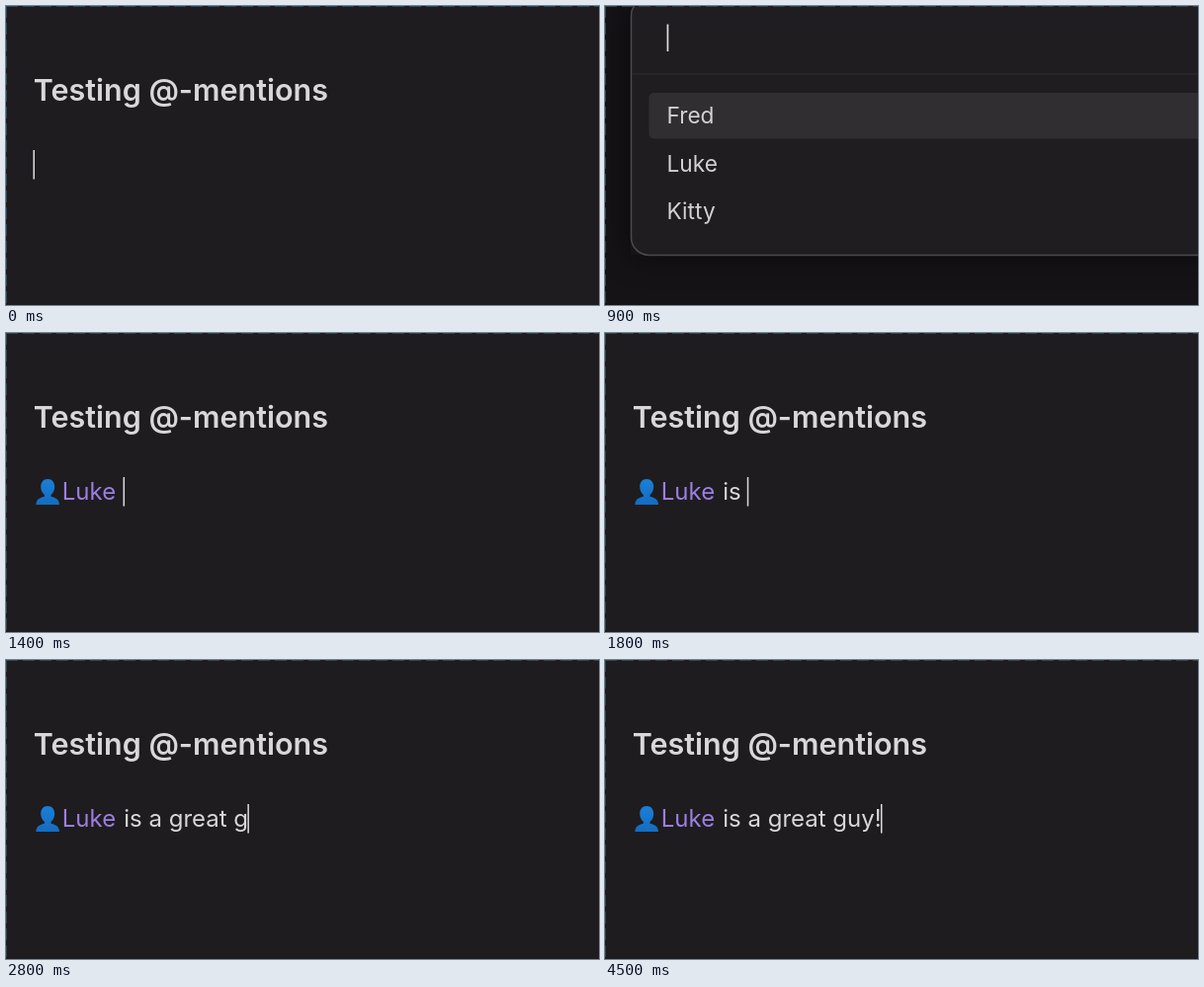
Recreate the animation shown at these times as an HTML page. Size 600 by 303 pixels, loop 5 s.

```html
<!DOCTYPE html>
<html lang="en">
<head>
<meta charset="utf-8">
<title>Testing @-mentions</title>
<style>
  html, body { margin: 0; width: 100%; height: 100%; overflow: hidden; background: #1e1c1f; }
  svg { display: block; width: 100%; height: 100%; }
  text {
    font-family: Inter, sans-serif;
    font-optical-sizing: none;
    white-space: pre;
    fill: #d8d7d9;
  }
  .title { font-size: 30.5px; font-weight: 600; }
  .body { font-size: 24px; }
  .menu { font-size: 22.7px; fill: #d2d1d3; }
  .mention { fill: #9c7fe0; }
  .caret { fill: #dcdbdd; }
  .edge { fill: none; stroke-dasharray: 12 5; }
</style>
</head>
<body>
<svg viewBox="0 0 600 303">
  <defs>
    <linearGradient id="blue" x1="0" y1="0" x2="0" y2="1">
      <stop offset="0" stop-color="#1b7fd8"/>
      <stop offset="1" stop-color="#146cc0"/>
    </linearGradient>
    <filter id="shadow" x="-20%" y="-20%" width="140%" height="170%">
      <feGaussianBlur stdDeviation="16"/>
    </filter>
  </defs>

  <g id="note">
    <rect width="600" height="303" fill="#1e1c1f"/>
    <text class="title" x="27.700" y="96.200">Testing @-mentions</text>
    <g id="mention">
      <path fill="url(#blue)" d="M42.200 148c4.500 0 7 3.400 7 7.800 0 3.500-1.500 6.600-3.700 8.200v1.700c5.800 1.300 8.500 3.600 8.500 8.300H30.400c0-4.700 2.700-7 8.500-8.300V164c-2.200-1.600-3.700-4.700-3.700-8.200 0-4.400 2.500-7.800 7-7.800z"/>
      <text class="body mention" x="56.800" y="169">Luke</text>
    </g>
    <text class="body" id="tail" x="112.500" y="169"></text>
    <rect class="caret" id="noteCaret" y="146" width="1.500" height="29.500"/>
  </g>

  <g id="popup">
    <rect width="600" height="303" fill="#151316"/>
    <rect class="panel" x="26" y="-2" width="640" fill="#09080a" opacity=".6" filter="url(#shadow)"/>
    <rect class="panel" x="26.500" y="-8" width="640" rx="18" fill="#1f1d20" stroke="#4b4a4c" stroke-width="1.500"/>
    <path d="M27 69H600" stroke="#2a282b" stroke-width="1.500"/>
    <rect x="44.500" y="88" width="600" height="46.500" rx="5" fill="#302e31"/>
    <text class="menu" id="query" x="62.300" y="40.300"></text>
    <rect class="caret" id="queryCaret" y="18.500" width="1.700" height="27.500"/>
    <g id="list"></g>
  </g>

  <path class="edge" id="edge" d="M0 .5H600M.5 0V303"/>
</svg>
<script>
  const LOOP = 5000, ROW = 48.7, TAIL_X = 112.5, QUERY_X = 62.3;
  const people = ["Fred", "Luke", "Kitty"];
  const $ = id => document.getElementById(id);

  // Each step: start time, view, text typed so far, caret shown
  const steps = [
    [0, "empty", "", true],
    [100, "empty", "", false],
    [700, "empty", "", true],
    [900, "popup", "", true],
    [1100, "popup", "l", true],
    [1200, "popup", "lu", true],
    [1400, "note", " ", true],
    [1600, "note", " i", true],
    [1700, "note", " is", true],
    [1800, "note", " is ", true],
    [1900, "note", " is a", true],
    [2000, "note", " is a ", true],
    [2200, "note", " is a g", true],
    [2400, "note", " is a gr", true],
    [2500, "note", " is a gre", true],
    [2600, "note", " is a grea", true],
    [2700, "note", " is a great", true],
    [2800, "note", " is a great g", true],
    [2900, "note", " is a great gu", true],
    [3100, "note", " is a great guy", true],
    [3300, "note", " is a great guy!", true],
    [3900, "note", " is a great guy!", false],
    [4500, "note", " is a great guy!", true]
  ];

  const show = (el, on) => el.setAttribute("visibility", on ? "visible" : "hidden");

  function type(el, text) {
    el.textContent = text;
    return text ? el.getComputedTextLength() : 0;
  }

  function drawList(query) {
    const matches = people.filter(name => name.toLowerCase().startsWith(query));
    $("list").innerHTML = matches.map((name, i) =>
      `<text class="menu" x="62.5" y="${119 + i * ROW}">${name}</text>`).join("");
    const bottom = 155 + (matches.length - 1) * ROW;
    document.querySelectorAll(".panel").forEach(el =>
      el.setAttribute("height", bottom - el.getAttribute("y")));
  }

  function draw([time, view, text, caret]) {
    const inPopup = view === "popup", inNote = view === "note";
    show($("note"), !inPopup);
    show($("popup"), inPopup);
    show($("mention"), inNote);
    show($("noteCaret"), caret && !inPopup);
    show($("queryCaret"), caret && inPopup);
    $("edge").setAttribute("stroke", time < 900 ? "#204a63" : "#264453");

    if (inPopup) {
      drawList(text);
      $("queryCaret").setAttribute("x", QUERY_X + type($("query"), text) + (text ? -0.5 : 0.3));
    } else {
      const width = type($("tail"), text);
      $("noteCaret").setAttribute("x", inNote ? TAIL_X + width - 0.7 : 27.5);
    }
  }

  const start = performance.now();
  let current;
  function tick() {
    const t = Math.max(0, performance.now() - start) % LOOP;
    const step = steps.findLast(s => s[0] <= t);
    if (step !== current) draw(current = step);
    requestAnimationFrame(tick);
  }
  tick();
</script>
</body>
</html>
```
